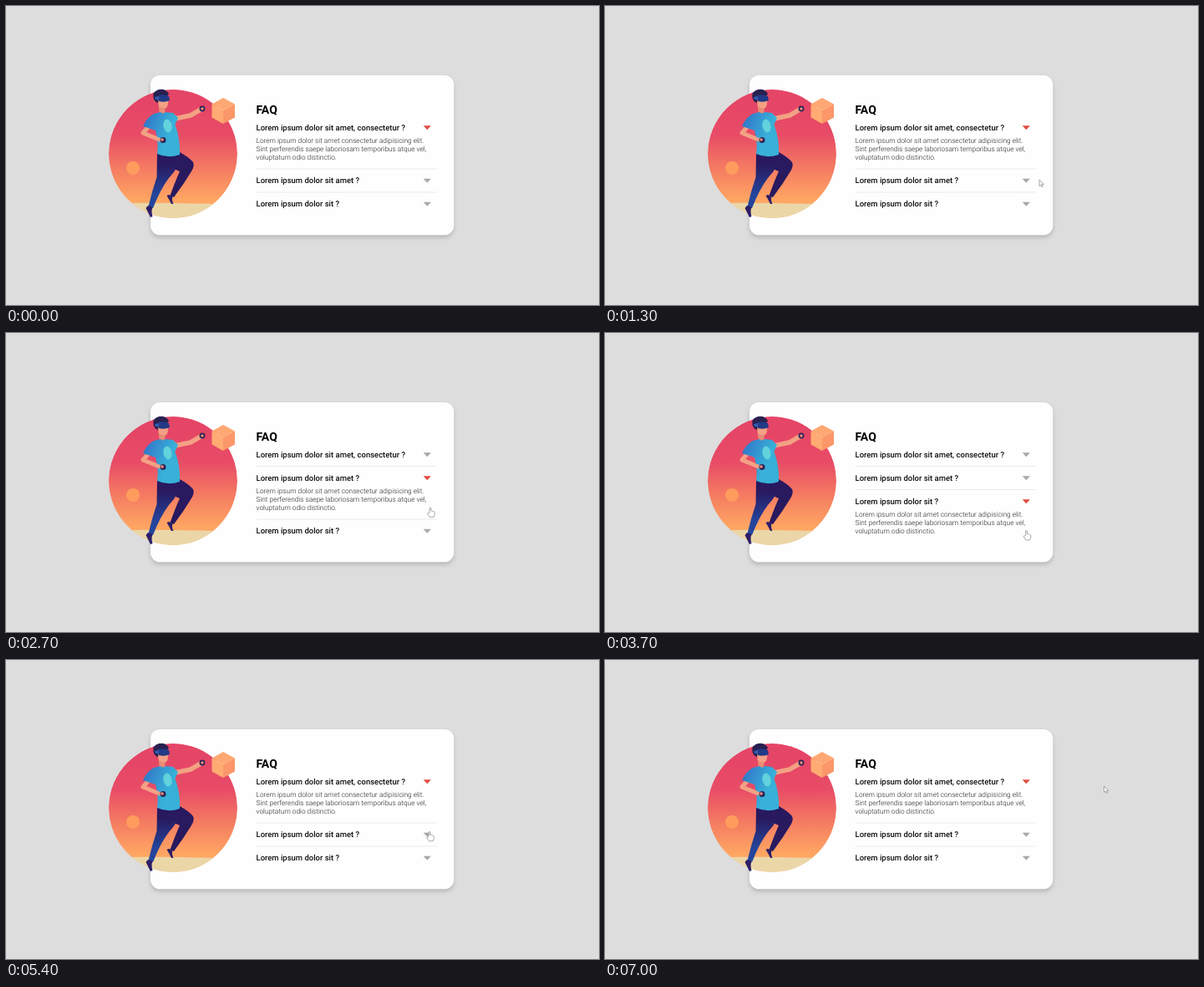
Recreate the animation shown at these times as an HTML page. Size 710 by 358 pixels, loop 7.3 s.

```html
<!DOCTYPE html>
<html lang="en">
<head>
<meta charset="utf-8">
<title>FAQ accordion</title>
<style>
html, body { margin: 0; width: 100%; height: 100%; overflow: hidden; background: #dddddd; }
svg { display: block; }
text { font-family: Roboto, sans-serif; text-rendering: geometricPrecision; }
.head { font-size: 14px; font-weight: 700; }
.ask { font-size: 9.48px; font-weight: 500; fill: #111; }
.reply { font-size: 8.31px; font-weight: 300; fill: #222; }
.card { fill: #fefefe; filter: drop-shadow(0 3px 2.5px rgba(0, 0, 0, .17)); }
.skin { fill: none; stroke: #f3a184; stroke-linecap: round; stroke-linejoin: round; }
#cursor path { fill: #fff; stroke: #858585; stroke-width: .7; stroke-linejoin: round; }
</style>
</head>
<body>
<svg width="710" height="358" viewBox="0 0 710 358">
  <defs>
    <linearGradient id="sky" x2="0" y2="1">
      <stop offset=".1" stop-color="#e54566"/><stop offset=".36" stop-color="#e84c66"/>
      <stop offset=".6" stop-color="#f47962"/><stop offset=".86" stop-color="#ffa663"/>
    </linearGradient>
    <linearGradient id="shirt" x2="1" y2=".5">
      <stop offset=".1" stop-color="#3277c8"/><stop offset=".75" stop-color="#38b0d8"/>
    </linearGradient>
    <linearGradient id="leg" x2="0" y2="1">
      <stop offset=".2" stop-color="#29195f"/><stop offset=".75" stop-color="#24459b"/>
    </linearGradient>
    <clipPath id="disc"><circle cx="200" cy="177" r="77"/></clipPath>
  </defs>

  <rect class="card" x="173" y="83" width="363.3" height="191.300" rx="11.500"/>

  <g clip-path="url(#disc)">
    <circle cx="200" cy="177" r="77" fill="url(#sky)"/>
    <path d="M120 237Q160 235 200 236T280 237V256H120Z" fill="#ebd6a8"/>
    <circle cx="152" cy="194" r="8" fill="#ff9c5d"/>
  </g>
  <path d="M260 110l14 7.500l-14 7.500l-13.500-7.500Z" fill="#ffa873"/>
  <path d="M246.500 117.500L260 125v16l-13.500-7.500Z" fill="#ffab72"/>
  <path d="M260 125l14-7.500v16l-14 7.500Z" fill="#fb9768"/>

  <!-- player -->
  <path class="skin" d="M202 135L221 131L233 124" stroke-width="5.500"/>
  <circle cx="235" cy="123" r="2.600" fill="#ef8d78" stroke="#2c2457" stroke-width="1.700"/>
  <path d="M195 177L208 175Q219 181 224 187Q226 192 222 198Q213 213 201 229L196.500 227Q203 209 208 198L194 192Z" fill="#29195f"/>
  <path d="M195 226L199.500 228Q198 232 200.500 237L198 237Q195 231 192.500 227Z" fill="#2c1d67"/>
  <path d="M181 176L208 178Q208 193 195 206Q185 219 176 242L170.500 240Q175 221 180.500 205Z" fill="url(#leg)"/>
  <path d="M170 239L175.500 241Q173.500 246 175.500 252L173 253Q170 247 167.500 242Z" fill="#2c1d67"/>
  <path d="M182.500 118L191 119L190 131L184 131Z" fill="#e98b75"/>
  <path class="skin" d="M171 144L164 152L185 160.500" stroke-width="5"/>
  <path d="M177 129L185 127Q188 130 191 127L200 128L206 134L202.500 142Q209 160 208 178Q194 183 181 177Q183 164 179 149L164 144Q168 134 177 129Z" fill="url(#shirt)"/>
  <ellipse cx="193.500" cy="143.500" rx="5" ry="8" transform="rotate(-12 193.500 143.500)" fill="#62d2dc"/>
  <path class="skin" d="M164 152L185 160.500" stroke-width="4.500"/>
  <circle cx="188" cy="160.500" r="3.500" fill="#2c2457"/>
  <circle cx="187" cy="160" r="1.800" fill="#ef8d78"/>
  <path d="M181 107L194 109Q195 117 192.500 121.500Q188 124 183 120Z" fill="#f3a184"/>
  <path d="M176.500 110Q175 102 183 100Q191 98.500 195 105L193 108L183 109L182 116Q178 115 176.500 110Z" fill="#282150"/>
  <path d="M182 107Q189 105 195 108L196 113Q190 116 183 114Z" fill="#223a86"/>
  <path d="M178 109L183 108V112L179 112Z" fill="#315cb2"/>

  <text class="head" x="299.500" y="128.700">FAQ</text>
  <g id="rows"></g>
  <g id="cursor">
    <path id="arrow" d="M0 0V7.600L1.800 6L3 8.700L4.300 8.100L3.100 5.500H5.300Z"/>
    <path id="hand" d="M-.9 6V.5Q0-.6.9.5V4Q2 3.300 2.600 4.400Q3.700 3.900 4.200 5Q5.300 4.800 5.300 6V8.200L4.200 11.400H-.7L-3.300 7.300Q-3.200 5.500-1.700 6.600Z"/>
  </g>
</svg>
<script>
const LOOP = 7300, FOLD = 400, BODY = 35.5, PITCH = 28;
const asks = [
  "Lorem ipsum dolor sit amet, consectetur ?",
  "Lorem ipsum dolor sit amet ?",
  "Lorem ipsum dolor sit ?"
];
const reply = [
  "Lorem ipsum dolor sit amet consectetur adipisicing elit.",
  "Sint perferendis saepe laboriosam temporibus atque vel,",
  "voluptatum odio distinctio."
];
// [time, row opened]
const clicks = [[-FOLD, 0], [1850, 1], [3030, 2], [4850, 0], [5480, 1], [6330, 0]];
// [time, x, y] of the pointer tip
const track = [
  [250, 603, 362], [1000, 531, 222], [1300, 520, 208], [1600, 508, 209],
  [2700, 508, 209], [3000, 504.5, 236.5], [3700, 504.5, 236.5], [4550, 508.5, 145.5],
  [5050, 508.5, 145.5], [5450, 507, 208], [5620, 507, 208], [6080, 508.5, 149.5],
  [6600, 508.5, 149.5], [6980, 597.5, 151]
];

const $ = id => document.getElementById(id);
const mix = (a, b, k) => a + (b - a) * k;
const smooth = k => { k = Math.min(1, Math.max(0, k)); return k * k * (3 - 2 * k); };

$("rows").innerHTML = asks.map((ask, i) => `<g>
  <clipPath id="fold${i}"><rect x="295" y="10" width="225"/></clipPath>
  <text class="ask" x="299.500" y="3.100">${ask}</text>
  <path class="mark" d="M499.700-2.500h9.200l-4.600 5Z"/>
  <g clip-path="url(#fold${i})">${reply.map((line, n) =>
    `<text class="reply" x="299.500" y="${18.2 + n * 10}">${line}</text>`).join("")}</g>
  ${i < 2 ? '<path class="rule" d="M299.500 0H516.500" stroke="#ebebeb"/>' : ""}
</g>`).join("");
const rows = [...$("rows").children];

function openness(t) {
  const n = clicks.findLastIndex(c => c[0] <= t);
  const open = [0, 0, 0];
  const k = smooth((t - clicks[n][0]) / FOLD);
  if (n > 0) open[clicks[n - 1][1]] = 1 - k;
  open[clicks[n][1]] = k;
  return open;
}

function drawRows(t) {
  let y = 145.8;
  openness(t).forEach((k, i) => {
    const row = rows[i], rule = row.querySelector(".rule");
    row.setAttribute("transform", `translate(0 ${y})`);
    row.querySelector("rect").setAttribute("height", BODY * k);
    row.querySelector(".mark").setAttribute("fill",
      `rgb(${mix(168, 228, k)},${mix(168, 74, k)},${mix(168, 64, k)})`);
    if (rule) rule.setAttribute("transform", `translate(0 ${13.7 + BODY * k})`);
    y += PITCH + BODY * k;
  });
}

function drawCursor(t) {
  const n = track.findLastIndex(p => p[0] <= t);
  $("cursor").style.display = n < 0 ? "none" : "";
  if (n < 0) return;
  const a = track[n], b = track[n + 1] || a;
  const k = a === b ? 0 : smooth((t - a[0]) / (b[0] - a[0]));
  const x = mix(a[1], b[1], k), y = mix(a[2], b[2], k);
  $("cursor").setAttribute("transform", `translate(${x} ${y})`);
  $("hand").style.display = x < 516 ? "" : "none";
  $("arrow").style.display = x < 516 ? "none" : "";
}

const start = performance.now();
function frame() {
  const t = (performance.now() - start) % LOOP;
  drawRows(t);
  drawCursor(t);
  requestAnimationFrame(frame);
}
frame();
</script>
</body>
</html>
```
